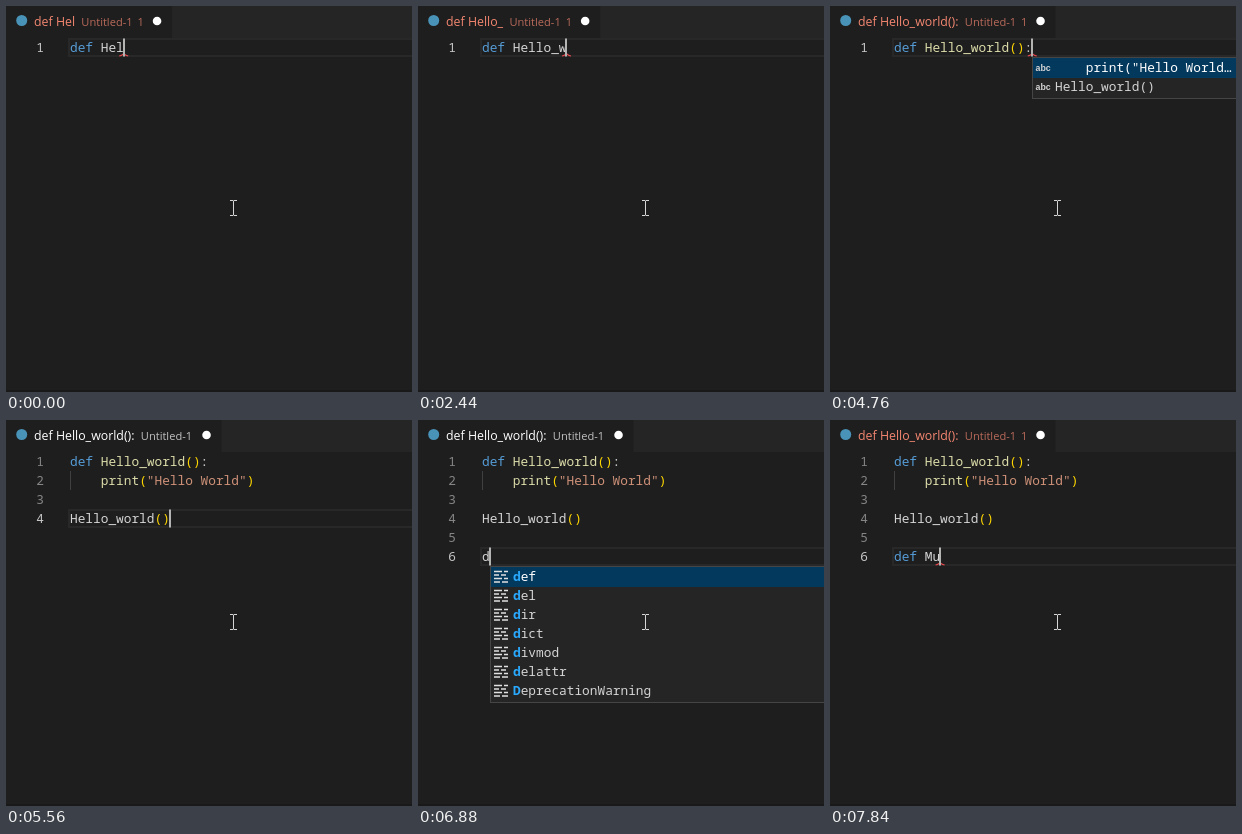
Write an HTML page that moves like this. It is 406 px wide and 386 px high and loops after 8000 ms.

```html
<!DOCTYPE html>
<html lang="en">
<head>
<meta charset="utf-8">
<title>Typing in an editor</title>
<style>
  html, body { margin: 0; width: 100%; height: 100%; overflow: hidden; background: #1e1e1e; }
  svg { display: block; }
  text { white-space: pre; }
  .tab { font: 12.35px "Open Sans", "Noto Sans", sans-serif; }
  .small { font-size: 11.1px; opacity: .72; }
  .mono { font: 12.8px "Noto Sans Mono", "DejaVu Sans Mono", monospace; fill: #d4d4d4; }
  .abc { font: bold 8.8px "Liberation Sans", sans-serif; }
  .hit { fill: #2aaaff; font-weight: bold; }
</style>
</head>
<body>
<svg width="406" height="386" viewBox="0 0 406 386">
  <rect width="406" height="386" fill="#1e1e1e"/>
  <rect width="406" height="32" fill="#252526"/>
  <rect id="tab" height="32" fill="#1e1e1e"/>
  <circle cx="15.7" cy="14.5" r="5.5" fill="#4a93b8"/>
  <g id="label" class="tab">
    <text id="title" x="28" y="20"></text>
    <text id="file" class="small" y="20">Untitled-1</text>
    <text id="badge" class="small" y="20">1</text>
  </g>
  <circle id="dot" cy="15" r="4.3" fill="#fff"/>
  <rect id="line" x="63" width="360" height="17" fill="none" stroke="#282828" stroke-width="2"/>
  <g id="code" class="mono"></g>
  <path id="wave" fill="none" stroke="#e5484d" stroke-width="1.2"/>
  <rect id="caret" width="2" height="18" fill="#b4b5b3"/>
  <g id="popup" class="mono"></g>
  <path d="M224 194.5h3l.5 .5 .5-.5h3M227.5 195v14M224 209.5h3l.5-.5 .5 .5h3" fill="none" stroke="#d6d6d6"/>
  <rect y="384" width="406" height="2" fill="#191919"/>
</svg>
<script>
const LOOP = 8000, CHAR = 7.68, LEFT = 64, TOP = 32, ROW = 19;
const $ = id => document.getElementById(id);
const set = (id, attrs) => { for (const k in attrs) $(id).setAttribute(k, attrs[k]); };

const head = "def Hello_world():";
const body = [head, '    print("Hello World")', "", "Hello_world()"];
const one = n => ({ rows: [head.slice(0, n)], on: true });
const name = n => ({ title: head.slice(0, n) });
const last = s => ({ rows: [...body, "", s], on: true });
const words = { icon: "abc", items: ['    print("Hello World…', "Hello_world()"] };
const keys = (hit, ...items) => ({ icon: "key", hit, items });

// Each step changes part of the editor state from its time on.
const steps = [
  [0, { ...one(7), ...name(7), err: true, popup: null, back: 0 }],
  [40, one(8)], [80, name(8)], [120, one(9)],
  [520, { ...name(9), on: false }], [960, { on: true }], [1440, { on: false }],
  [1920, one(10)], [2040, name(10)],
  [2440, one(11)], [2520, name(11)],
  [2680, one(12)], [2760, name(12)],
  [3000, one(13)], [3040, name(13)],
  [3200, one(14)], [3240, name(14)],
  [3320, one(15)], [3360, name(15)],
  [3760, { on: false }],
  [4160, { ...one(17), back: 1 }], [4240, { back: 0 }], [4280, name(17)],
  [4520, one(18)], [4560, name(18)],
  [4760, { popup: words }], [4960, { on: false }],
  [5440, { rows: body, popup: null, on: true }],
  [5560, { err: false }],
  [5640, { rows: [...body, ""] }],
  [5960, last("")], [6480, { on: false }],
  [6760, last("d")],
  [6840, { popup: keys(1, "def", "del", "dir", "dict", "divmod", "delattr", "DeprecationWarning") }],
  [6920, last("de")],
  [6960, { popup: keys(2, "def", "del", "delattr") }],
  [7080, { ...last("def"), popup: keys(3, "def") }],
  [7120, { err: true }],
  [7240, { ...last("def "), popup: null }],
  [7600, last("def M")], [7800, last("def Mu")]
];

const rules = [
  [/^def\b/, "#569cd6"],
  [/^(print|(?<=def )\w+(?=\())/, "#dcdcaa"],
  [/^"[^"]*"/, "#ce9178"],
  [/^[()]/, "#ffd700"],
  [/^(\w+|\s+|.)/, "#d4d4d4"]
];

function paint(s) {
  let out = "", fn = false;
  while (s) {
    let [re, color] = rules.find(r => r[0].test(s));
    const word = s.match(re)[0];
    if (fn && s[word.length] === "(" && /\w/.test(word)) color = "#dcdcaa";
    if (word === "def") fn = true;
    out += `<tspan fill="${color}">${word}</tspan>`;
    s = s.slice(word.length);
  }
  return out;
}

function drawCode(s) {
  const cur = s.rows.length - 1;
  $("code").innerHTML = s.rows.map((row, i) => {
    const y = TOP + i * ROW + 14;
    const guide = row.startsWith("    ")
      ? `<path d="M64.5 ${y - 14}v${ROW}" stroke="#404040"/>` : "";
    return `<text x="38" y="${y}" text-anchor="end" fill="${i === cur ? "#c6c6c6" : "#858585"}">${i + 1}</text>`
      + guide + `<text x="${LEFT}" y="${y}">${paint(row)}</text>`;
  }).join("");
  const top = TOP + cur * ROW, end = LEFT + s.rows[cur].length * CHAR;
  set("line", { y: top + 1 });
  set("caret", { x: Math.round(end - s.back * CHAR) - 1, y: top + .5, visibility: s.on ? "visible" : "hidden" });
  set("wave", {
    d: `M${end - 4.5} ${top + 18}l2-.6 2.5-1.6 2.5 1.6 2 .6`,
    visibility: s.err ? "visible" : "hidden"
  });
  return [Math.round(end), top + ROW];
}

function drawTab(s) {
  $("title").textContent = s.title;
  const end = 28 + $("title").getComputedTextLength(), shift = s.err ? 10 : 0;
  set("label", { fill: s.err ? "#f48771" : "#fff" });
  set("file", { x: end + 6.3 });
  set("badge", { x: end + 62.5, visibility: s.err ? "visible" : "hidden" });
  set("dot", { cx: end + 72 + shift });
  set("tab", { width: end + 87 + shift });
}

function icon(kind, x, y) {
  if (kind === "abc") return `<text class="abc" x="${x + 3.5}" y="${y + 13}">abc</text>`;
  return `<path d="M${x + 4} ${y + 4.5}h8m2 0h4m-14 3.5h5m2 0h5m-12 3.5h8m2 0h4m-14 3.5h6m2 0h6" fill="none" stroke="#e0e0e0" stroke-width="1.5"/>`;
}

function drawPopup(p, x, y) {
  if (!p) return $("popup").innerHTML = "";
  const h = p.items.length * ROW + 3;
  $("popup").innerHTML =
    `<rect x="${x + .5}" y="${y + .5}" width="420" height="${h}" fill="#252526" stroke="#454545"/>`
    + p.items.map((item, i) => {
      const top = y + 1 + i * ROW, hit = p.hit || 0;
      return (i ? "" : `<rect x="${x + 1}" y="${top}" width="419" height="20" fill="#04395e"/>`)
        + icon(p.icon, x, top)
        + `<text x="${x + 23}" y="${top + 14}" fill="${i ? "#d4d4d4" : "#fff"}">`
        + `<tspan class="hit">${item.slice(0, hit)}</tspan>${item.slice(hit)}</text>`;
    }).join("");
}

let shown = -1;
function frame(now) {
  const t = now % LOOP;
  const past = steps.filter(step => step[0] <= t);
  if (past.length !== shown) {
    shown = past.length;
    const s = Object.assign({}, ...past.map(step => step[1]));
    drawTab(s);
    drawPopup(s.popup, ...drawCode(s));
  }
}

const start = performance.now();
function tick() {
  frame(performance.now() - start);
  requestAnimationFrame(tick);
}
tick();
</script>
</body>
</html>
```
